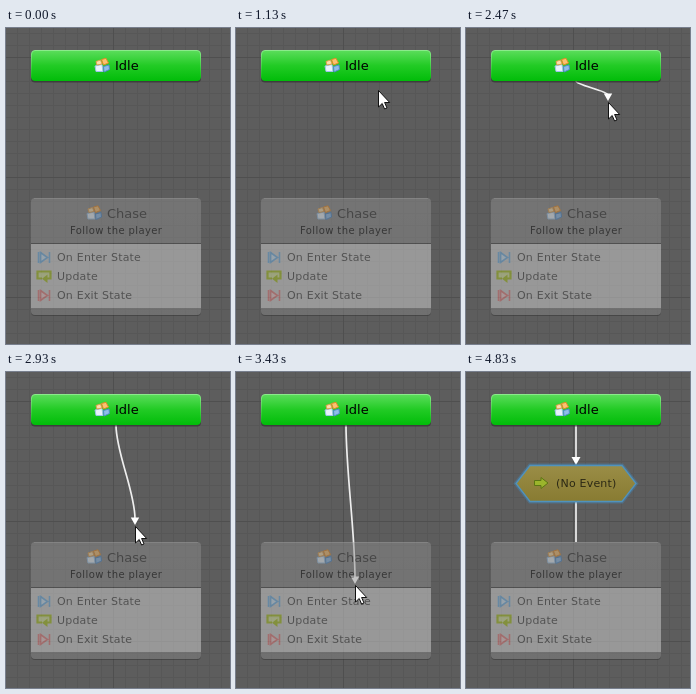
An HTML page that plays this animation: 224 by 316 pixels, repeating every 5910 ms.

```html
<!DOCTYPE html>
<html lang="en">
<head>
<meta charset="utf-8">
<title>State transition</title>
<style>
  html, body { margin: 0; height: 100%; overflow: hidden; background: #5d5d5d; }
  svg { display: block; width: 224px; height: 316px; }
  text { font: 11px "DejaVu Sans", sans-serif; letter-spacing: .2px; }
  .title { font-size: 13px; letter-spacing: 0; }
  .note { font-size: 10px; letter-spacing: .4px; }
  .wire { fill: none; stroke: #eee; stroke-width: 1.7; }
  .head { fill: #fff; }
</style>
</head>
<body>
<svg viewBox="0 0 224 316">
  <defs>
    <pattern id="minor" width="12" height="12" x="11" y="5" patternUnits="userSpaceOnUse">
      <path d="M.5 0V12M0 .5H12" stroke="#575757"/>
    </pattern>
    <pattern id="major" width="120" height="120" x="107" y="29" patternUnits="userSpaceOnUse">
      <path d="M.5 0V120M0 .5H120" stroke="#4f4f4f"/>
    </pattern>
    <linearGradient id="green" x2="0" y2="1">
      <stop stop-color="#5bdd5b"/><stop offset=".5" stop-color="#22cb25"/><stop offset="1" stop-color="#02bd0a"/>
    </linearGradient>
    <linearGradient id="bevel" x2="0" y2="1">
      <stop stop-color="#8bea8b"/><stop offset="1" stop-color="#02bd0a"/>
    </linearGradient>
    <linearGradient id="grey" x2="0" y2="1">
      <stop stop-color="#8c8c8c"/><stop offset="1" stop-color="#848484"/>
    </linearGradient>
    <linearGradient id="olive" x2="0" y2="1">
      <stop stop-color="#9a8d46"/><stop offset="1" stop-color="#887b32"/>
    </linearGradient>
    <g id="state" stroke-width="1" stroke-linejoin="round">
      <path d="M1 8.5 8 7 9 14 2 14Z" fill="#e8f2fa" stroke="#9cc3e6"/>
      <path d="M9.5 9 15 7.5 15.5 12 10 14.5Z" fill="#8fbdea" stroke="#4e8ccb"/>
      <path d="M2 4 6.5 2.5 8 6.5 3 7.5Z" fill="#fbdfae" stroke="#e2a04c"/>
      <path d="M7.5 2 12 .8 14.5 5.5 9.5 7.5Z" fill="#fbc272" stroke="#e58a24"/>
    </g>
    <path id="step" d="M1.5 1V12M12.5 1V12M3.5 1.5 10.5 6.5 3.5 11.5Z" stroke-width="1.6"/>
  </defs>

  <rect width="224" height="316" fill="#5d5d5d"/>
  <rect width="224" height="316" fill="url(#minor)"/>
  <rect width="224" height="316" fill="url(#major)"/>

  <g id="drag">
    <path id="dragWire" class="wire"/>
    <path id="dragHead" class="head" d="M-4.2-6.5H4.2L0 1Z"/>
  </g>
  <g id="linked">
    <path class="wire" d="M110 53V87M110 130V170"/>
    <path class="head" d="M105.5 85H114.5L110 93Z"/>
  </g>

  <rect x="25" y="24" width="170" height="30.5" rx="4" fill="#333" opacity=".7"/>
  <rect x="25.5" y="22.5" width="169" height="30" rx="3.5" fill="url(#green)" stroke="url(#bevel)"/>
  <use href="#state" x="88" y="29.5"/>
  <text class="title" x="109" y="42">Idle</text>

  <g opacity=".5">
    <rect x="25" y="172" width="170" height="116" rx="4" fill="#333"/>
    <rect x="25" y="170" width="170" height="117" rx="4" fill="url(#grey)"/>
    <path d="M25 216H195V280H25Z" fill="#d4d4d4"/>
    <path d="M28 170.5H192" stroke="#aaa"/>
    <path d="M25 215.5H195" stroke="#444"/>
    <use href="#state" x="80" y="177"/>
    <text class="title" x="101" y="190" fill="#333">Chase</text>
    <text class="note" x="64" y="206" fill="#111">Follow the player</text>
    <use href="#step" x="31" y="223" fill="#cfe6f8" stroke="#73b4e6"/>
    <path d="M36 250.5H31.5V243.5H44.5V250.5H41" fill="#dbe9a0" stroke="#a9c41e" stroke-width="2.2"/>
    <path d="M41.5 246.5V255L36 250.8Z" fill="#a9c41e"/>
    <use href="#step" x="31" y="261" fill="#f3d0d0" stroke="#e67f7f"/>
    <g fill="#484848">
      <text x="51" y="233">On Enter State</text>
      <text x="51" y="252">Update</text>
      <text x="51" y="271">On Exit State</text>
    </g>
  </g>

  <g id="event">
    <path d="M50 111.5 64 93.5H156L170 111.5 156 129.5H64Z" fill="url(#olive)" stroke="#4385b5" stroke-opacity=".45" stroke-width="4"/>
    <path d="M50 111.5 64 93.5H156L170 111.5 156 129.5H64Z" fill="url(#olive)" stroke="#4f92bd" stroke-width="1.3"/>
    <path d="M68.5 108.5H75V105.5L82 111 75 116.5V113.5H68.5Z" fill="#9bb52c" stroke="#5c7514"/>
    <text x="90" y="115" fill="#2c2915">(No Event)</text>
  </g>

  <path id="cursor" d="M.5.5V17L4.2 13.5 6.6 19 9 18 6.6 12.5H11.7Z" fill="#fff" stroke="#111"/>
</svg>
<script>
const LOOP = 5910, TICK = 100 / 3;
const ENTER = 19, DRAG = 63, DROP = 110, LEAVE = 145;
const IDLE = { x: 110, right: 195, middle: 38, bottom: 53 };

// Pointer path: tick, x, y
const path = [
  [19, 222, 207], [24, 183, 135], [29, 156, 85], [34, 142, 62], [36, 141, 56],
  [38, 140, 49], [44, 145, 33], [62, 145, 33], [74, 142, 74], [80, 137, 107],
  [88, 129, 154], [98, 121, 197], [103, 119, 213], [109, 116, 225], [125, 116, 225],
  [126, 116, 226], [130, 111, 236], [135, 97, 262], [140, 80, 292], [144, 71, 311]
];
const el = id => document.getElementById(id);
const show = (id, on) => el(id).setAttribute("visibility", on ? "visible" : "hidden");
const place = (id, x, y, turn = 0) =>
  el(id).setAttribute("transform", `translate(${x} ${y}) rotate(${turn})`);

const slope = (i, axis) => path[i] && path[i + 1]
  ? (path[i + 1][axis] - path[i][axis]) / (path[i + 1][0] - path[i][0]) : 0;

// Harmonic mean keeps the curve from overshooting at rests.
function tangent(i, axis) {
  const a = slope(i - 1, axis), b = slope(i, axis);
  if (i === 0) return b;
  if (i === path.length - 1) return a;
  return a * b > 0 ? 2 * a * b / (a + b) : 0;
}

function pointer(tick, axis) {
  const next = path.findIndex(p => p[0] >= tick);
  const i = Math.max(0, next - 1);
  const a = path[i], b = path[i + 1], span = b[0] - a[0], u = (tick - a[0]) / span;
  return Math.round(
    a[axis] * (1 + 2 * u) * (1 - u) ** 2 + b[axis] * u * u * (3 - 2 * u) +
    span * (tangent(i, axis) * u * (1 - u) ** 2 - tangent(i + 1, axis) * u * u * (1 - u)));
}

function drawWire(x, y) {
  if (y < IDLE.bottom + 4) {
    // While over its own state the wire loops out of the right side.
    const { right, middle } = IDLE;
    el("dragWire").setAttribute("d", `M${right} ${middle}C${right + 12} ${middle} ${x + 20} ${y} ${x + 6} ${y}`);
    place("dragHead", x, y, 90);
  } else {
    const end = y - 7, bend = (end - IDLE.bottom) * .3;
    el("dragWire").setAttribute("d",
      `M${IDLE.x} ${IDLE.bottom}C${IDLE.x} ${IDLE.bottom + bend} ${x} ${end - bend} ${x} ${end}`);
    place("dragHead", x, y - 2);
  }
}

function draw(now) {
  const tick = Math.floor((now % LOOP + 5) / TICK);
  const pointing = tick >= ENTER && tick < LEAVE;
  const dragging = tick >= DRAG && tick < DROP;
  show("cursor", pointing);
  show("drag", dragging);
  show("linked", tick >= DROP);
  show("event", tick >= DROP);
  if (pointing) {
    const x = pointer(tick, 1), y = pointer(tick, 2);
    place("cursor", x, y);
    if (dragging) drawWire(x, y);
  }
}

const start = performance.now();
function loop() {
  draw(performance.now() - start);
  requestAnimationFrame(loop);
}
loop();
</script>
</body>
</html>
```
